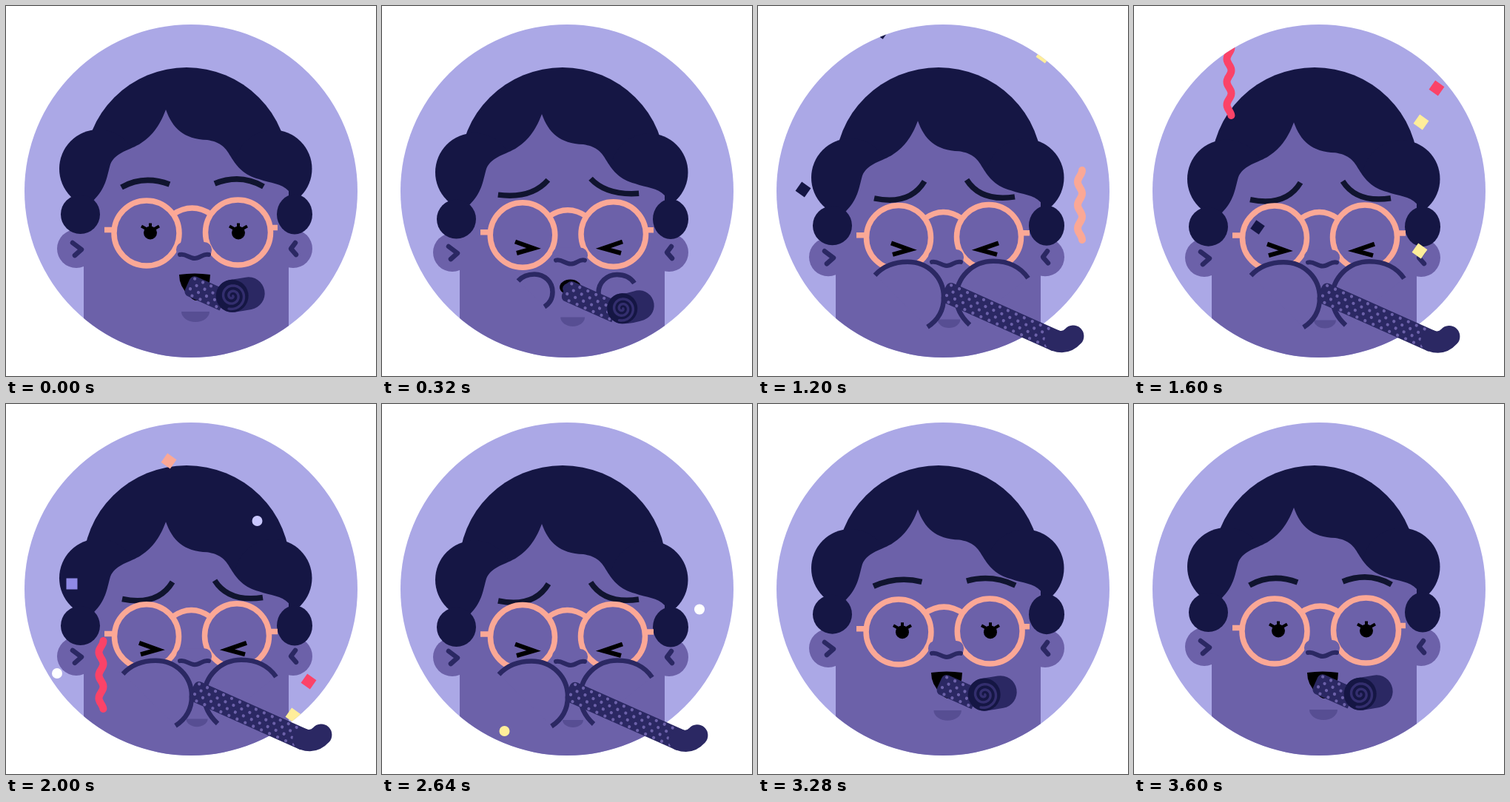
An HTML page with a canvas that plays this animation: 500 px wide and 500 px high, repeating every 3.68 s.

```html
<!DOCTYPE html>
<html lang="en">
<head>
<meta charset="utf-8">
<title>Party blower</title>
<style>
html, body { margin: 0; width: 100%; height: 100%; overflow: hidden; background: #fff; }
canvas { display: block; width: 500px; height: 500px; }
</style>
</head>
<body>
<canvas id="stage" width="500" height="500"></canvas>
<script>
const ctx = document.getElementById('stage').getContext('2d');
const LOOP = 3680, STEP = 80, TAU = Math.PI * 2;
const SKY = '#aba8e6', SKIN = '#6c61a9', HAIR = '#151644', LINE = '#2b2863',
  BROW = '#10142f', GLASS = '#fba896', CHIN = '#574e93',
  RED = '#fb4368', YELLOW = '#ffee9a', WHITE = '#fff';

const mix = (a, b, k) => a + (b - a) * k;
const smooth = k => k * k * (3 - 2 * k);
const linear = k => k;

// Interpolates [time, value] pairs with an optional easing.
function track(t, keys, ease = smooth) {
  if (t <= keys[0][0]) return keys[0][1];
  for (let i = 1; i < keys.length; i++) {
    const [t0, v0] = keys[i - 1], [t1, v1] = keys[i];
    if (t <= t1) return mix(v0, v1, ease((t - t0) / (t1 - t0)));
  }
  return keys[keys.length - 1][1];
}

function ellipse(x, y, rx, ry, color) {
  ctx.beginPath();
  ctx.ellipse(x, y, rx, ry, 0, 0, TAU);
  ctx.fillStyle = color;
  ctx.fill();
}
const disc = (x, y, r, color) => ellipse(x, y, r, r, color);

function stroke(path, color, width, cap = 'butt', join = 'miter') {
  ctx.strokeStyle = color;
  ctx.lineWidth = width;
  ctx.lineCap = cap;
  ctx.lineJoin = join;
  ctx.stroke(path);
}
function fill(path, color) {
  ctx.fillStyle = color;
  ctx.fill(path);
}
function at(x, y, draw) {
  ctx.save();
  ctx.translate(x, y);
  draw();
  ctx.restore();
}

const facePath = new Path2D(`M216 140 C207 164 196 177 180 187 C163 196 147 199 141 214
  C136 232 135 246 118 263 L105 282 V520 H382 V250 C372 239 358 240 342 234
  C322 229 312 217 304 204 C295 188 288 184 272 181 C240 180 225 165 216 140Z`);
const cheekLeft = new Path2D(`M158 363 C170 350 185 345 202 345 C230 345 251 366 251 393
  C251 410 243 424 229 433`);
const cheekRight = new Path2D(`M365 367 C355 352 338 344 318 344 C290 344 268 366 268 393
  C268 408 275 420 286 430`);
const nostril = new Path2D('M235 336 C243 334 247 341 255 341 C263 341 266 334 274 336');
const smile = new Path2D(`M234 363 Q255 360 276 363 Q276 381 264 396 Q255 402 247 391
  Q234 379 234 363Z`);
const earLeft = new Path2D('M90 320 L102 329 L93 337');
const earRight = new Path2D('M391 320 L385 328 L392 336');
const squintLeft = new Path2D('M180 318.5 L205 327.5 L182 334');
const squintRight = new Path2D('M325 318.5 L299 327.5 L323 334');

function drawHead(s) {
  const { push, drift, mood } = s;
  const earY = 10 * push + 4 * drift;
  disc(95, 328 + earY, 26, SKIN);
  disc(388, 328 + earY, 26, SKIN);

  const bunY = 220 + 9.5 * push + 8 * drift;
  ellipse(244, 221, 138 + 2 * push, 138, HAIR);
  disc(125, bunY, 53, HAIR);
  disc(361, bunY, 52.5, HAIR);
  at(0, 12 * push + 10 * drift, () => fill(facePath, SKIN));

  const curlY = 281.5 + 13 * push + 7 * drift;
  disc(100.5, curlY, 26.5, HAIR);
  ellipse(390, curlY, 24, 27, HAIR);
  at(0, earY, () => {
    stroke(earLeft, LINE, 6.5, 'round', 'round');
    stroke(earRight, LINE, 6.5, 'round', 'round');
  });

  drawBrow([156, 245, 186, 228, 221, 241], [157, 257, 205, 267, 225, 234], mood, drift);
  drawBrow([282, 240, 317, 226, 348, 244], [282, 232, 301, 262, 347, 255], mood, drift);
  drawMouth(s);
  drawEyes(s);
  drawGlasses(push, drift);

  at(0, 9 * mood + 3 * drift, () => {
    ctx.beginPath();
    ctx.roundRect(230, 319, 48, 21, 10);
    ctx.fillStyle = SKIN;
    ctx.fill();
    stroke(nostril, LINE, 6, 'round');
  });
}

function drawBrow(rest, strained, k, drift) {
  const [x0, y0, cx, cy, x1, y1] = rest.map((v, i) => mix(v, strained[i], k));
  const path = new Path2D();
  path.moveTo(x0, y0);
  path.quadraticCurveTo(cx, cy, x1, y1);
  at(0, 9 * drift, () => stroke(path, BROW, 7.5));
}

function drawEyes({ closed, drift, mood }) {
  if (closed) {
    at(0, 6 * drift, () => {
      stroke(squintLeft, '#000', 6);
      stroke(squintRight, '#000', 6);
    });
    return;
  }
  const lashes = new Path2D('M-12 -9 L-5 -5 M0 -13 V-5 M12 -9 L5 -5');
  for (const x of [195, 314]) {
    at(x, 306.5 + 16 * mood, () => {
      disc(0, 0, 9, '#000');
      stroke(lashes, '#000', 4);
    });
  }
}

function drawGlasses(push, drift) {
  const path = new Path2D();
  const lensY = 5 * push + 3 * drift, bridgeY = 5.5 * push, armY = 6.5 * push + 2 * drift;
  const rightX = 313.5 - 1.5 * push, r = 44 - 0.5 * push;
  path.arc(190, 307 + lensY, r, 0, TAU);
  path.moveTo(rightX + r, 306 + lensY);
  path.arc(rightX, 306 + lensY, r, 0, TAU);
  path.moveTo(225, 282 + bridgeY);
  path.quadraticCurveTo(251.5 - push, 264 + bridgeY, 278 - 2 * push, 282 + bridgeY);
  path.moveTo(133, 302.5 + armY);
  path.lineTo(146, 302.5 + armY);
  path.moveTo(357, 299.5 + armY);
  path.lineTo(367, 299.5 + armY);
  stroke(path, GLASS, 7.5);
}

function drawMouth({ mood, drift, reach }) {
  if (mood < 0.5) {
    fill(smile, '#000');
  } else {
    const open = 1 - reach;
    ellipse(254.5, 380, 18 * open, 13 * open, '#000');
    ellipse(254.5, 382, 13 * open, 10 * open, LINE);
  }
  ctx.beginPath();
  ctx.ellipse(256 + 2 * mood, 413 + 9 * mood + 5 * drift, 19 - 3 * mood - 2 * drift,
    14 - 2 * mood - 2 * drift, 0, 0, Math.PI);
  ctx.fillStyle = CHIN;
  ctx.fill();
}

function drawCheek(path, x, y, size, drift) {
  ctx.save();
  ctx.translate(x, y + 2.5 * drift);
  ctx.scale(size, size);
  ctx.translate(-x, -y);
  fill(path, SKIN);
  stroke(path, LINE, 6.5 / size);
  ctx.restore();
}

function drawBlower({ reach, mood, drift }) {
  const angle = 24 * Math.PI / 180, length = mix(50, 163, reach);
  const x = mix(247, 253, reach), y = 377 + 8 * mood + 2.5 * drift;
  const endX = x + length * Math.cos(angle), endY = y + length * Math.sin(angle);

  ctx.save();
  ctx.translate(x, y);
  ctx.rotate(angle);
  ctx.beginPath();
  ctx.roundRect(-2, -14.5, length + 4, 29, [7, 0, 0, 7]);
  ctx.fillStyle = LINE;
  ctx.fill();
  ctx.clip();
  for (let i = 0; i * 6 < length - 4; i++) {
    for (let row = i % 2; row < 4; row += 2) {
      disc(4 + i * 6, -11 + row * 7.5, 2.1, SKIN);
    }
  }
  ctx.restore();

  const r = mix(22, 14.5, reach);
  const coilX = endX + mix(13, 0, reach), coilY = endY + mix(-5.5, 0, reach);
  const roll = new Path2D();
  roll.moveTo(coilX, coilY);
  roll.quadraticCurveTo(endX + mix(24, 14, reach), endY + mix(-7, 5, reach),
    endX + mix(35, 24, reach), endY + mix(-9, -6, reach));
  stroke(roll, LINE, 2 * r, 'round');
  if (reach > 0.85) return;

  disc(coilX, coilY, r, HAIR);
  const spiral = new Path2D();
  for (let a = 0; a <= TAU * 2.3; a += 0.15) {
    const d = 1 + (r - 5) * a / (TAU * 2.3);
    spiral.lineTo(coilX + d * Math.cos(a), coilY + d * Math.sin(a));
  }
  stroke(spiral, '#332e6e', 3.4, 'round', 'round');
}

// kind, colour, x, y at the given time, time, size, angle in degrees
const confetti = [
  ['square', RED, 320, 118, 640, 16, 35],
  ['square', WHITE, 415, 248, 640, 15, 35],
  ['wave', YELLOW, 50, 209, 640, 114, 0],
  ['square', HAIR, 167, 35, 1200, 14, 35],
  ['square', HAIR, 61, 248, 1200, 15, 35],
  ['square', YELLOW, 386, 67, 1200, 15, 35],
  ['wave', GLASS, 435, 222, 1200, 94, 0],
  ['square', GLASS, 220, 77, 2000, 15, 35],
  ['dot', '#c9c7ff', 339.5, 158, 2000, 14, 0],
  ['square', '#8f8ae6', 89, 243, 2000, 15, 0],
  ['wave', RED, 128.5, 320, 2000, 93, 0],
  ['dot', WHITE, 69, 364, 2000, 14, 0],
  ['square', RED, 409, 375, 2000, 15, 35],
  ['square', YELLOW, 388, 421, 2000, 15, 35],
  ['dot', WHITE, 429, 277.5, 2640, 14, 0],
  ['dot', YELLOW, 165.5, 442, 2640, 14, 0]
];
const FALL = 0.66;

function drawConfetti(t) {
  for (const [kind, color, x, y, when, size, turn] of confetti) {
    const top = y + (t - when) * FALL;
    if (top < -130 || top > 520) continue;
    at(x, top, () => {
      ctx.rotate(turn * Math.PI / 180);
      if (kind === 'dot') disc(0, 0, size / 2, color);
      else if (kind === 'square') {
        ctx.fillStyle = color;
        ctx.fillRect(-size / 2, -size / 2, size, size);
      } else {
        const path = new Path2D();
        for (let v = 0; v <= size; v += 2) {
          path.lineTo(3 * Math.cos(v / size * TAU * 3), v);
        }
        stroke(path, color, 10, 'round', 'round');
      }
    });
  }
}

function stateAt(t) {
  return {
    push: track(t, [[80, 0], [560, 1], [2720, 1], [2960, 0.78], [3440, 0]]),
    drift: track(t, [[560, 0], [2560, 1], [2720, 1], [2960, 0]], linear),
    mood: track(t, [[80, 0], [400, 1], [2960, 1], [3360, 0]]),
    cheeks: track(t, [[160, 0], [480, 1], [2720, 1], [2960, 0.69], [3200, 0]]),
    reach: track(t, [[240, 0], [520, 1], [2720, 1], [2960, 0]]),
    closed: t >= 240 && t < 2880
  };
}

function render(t) {
  const s = stateAt(t);
  ctx.fillStyle = WHITE;
  ctx.fillRect(0, 0, 500, 500);
  ctx.save();
  ctx.beginPath();
  ctx.arc(250, 250, 225, 0, TAU);
  ctx.clip();
  ctx.fillStyle = SKY;
  ctx.fillRect(0, 0, 500, 500);
  drawHead(s);
  if (s.cheeks > 0.05) {
    drawCheek(cheekLeft, 210, 380, s.cheeks, s.drift);
    drawCheek(cheekRight, 317, 382, s.cheeks, s.drift);
  }
  drawConfetti(t);
  ctx.restore();
  drawBlower(s);
}

const start = performance.now();
function tick() {
  const t = (performance.now() - start) % LOOP;
  render(Math.floor(t / STEP) * STEP);
  requestAnimationFrame(tick);
}
tick();
</script>
</body>
</html>
```
